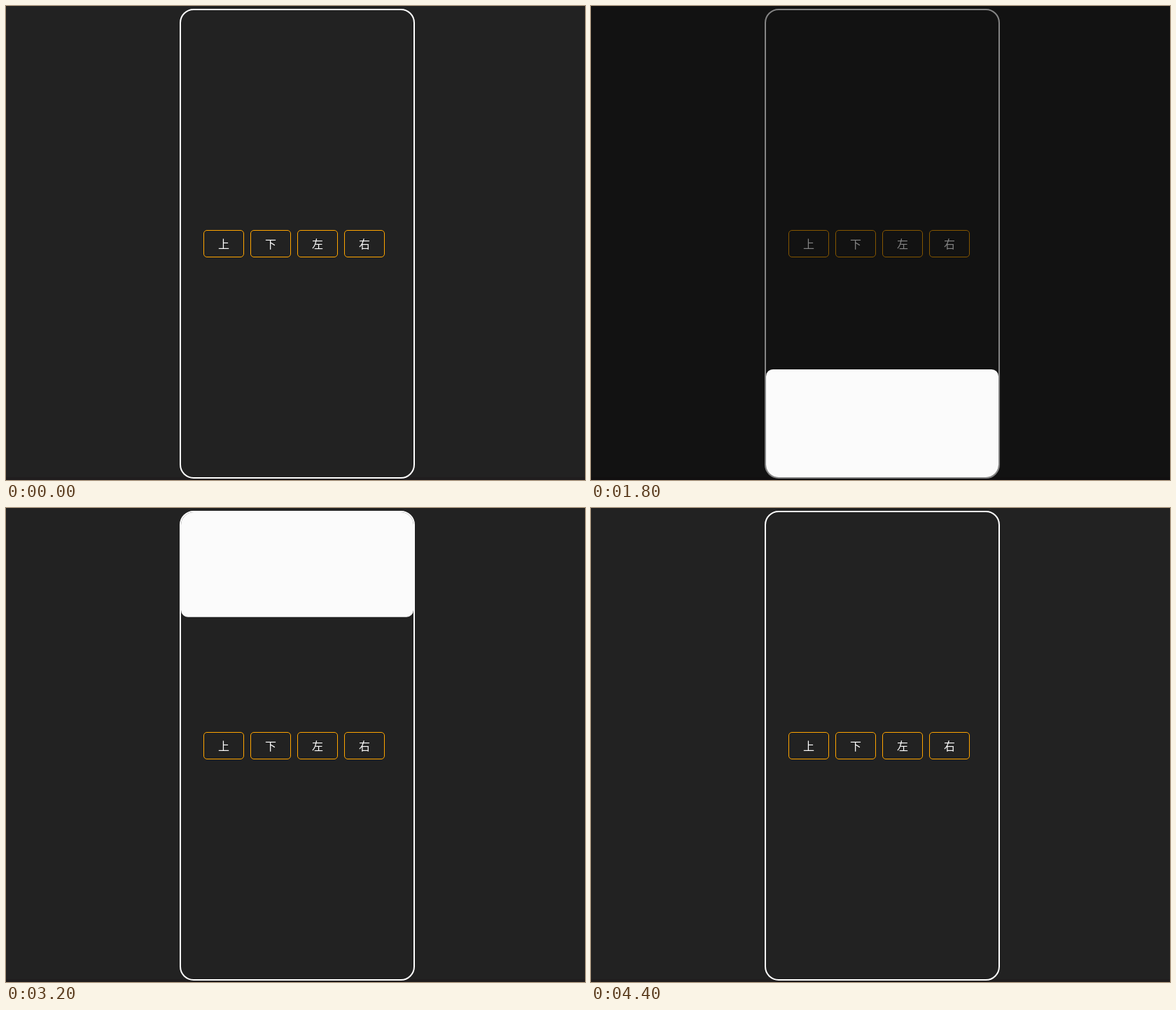
Animation, 827 px wide and 677 px high, one loop 4.7 s. Source, as an HTML page:

```html
<!DOCTYPE html>
<html lang="zh-CN">
<head>
<meta charset="utf-8">
<title>Drawers</title>
<style>
  html, body { margin: 0; width: 100%; height: 100%; overflow: hidden; background: #222; }
  svg { display: block; }
  text { font: 16px "Noto Sans CJK SC", "Noto Sans CJK", "Noto Sans CJK JP", sans-serif; fill: #fff; text-anchor: middle; }
</style>
</head>
<body>
<svg width="827" height="677" viewBox="0 0 827 677">
  <defs>
    <clipPath id="screen"><rect x="250" y="6" width="332" height="667" rx="18"/></clipPath>
  </defs>
  <rect width="827" height="677" fill="#222"/>
  <rect y="673" width="827" height="4" fill="#201d1e"/>
  <rect x="249" y="5" width="334" height="669" rx="19" fill="#222" stroke="#fff" stroke-width="2"/>
  <g id="buttons"></g>
  <rect id="shade" width="827" height="677" opacity="0"/>
  <g clip-path="url(#screen)"><rect id="drawer" rx="10" fill="#fbfbfb"/></g>
</svg>
<script>
const LOOP = 4700, STEP = 100, SLIDE = 300, SIZE = 192, DIM = 0.6;
const box = { x: 250, y: 6, w: 332, h: 667 };
const visits = [
  { side: 'right', open: 500, close: 1250 },
  { side: 'bottom', open: 1650, close: 2200 },
  { side: 'top', open: 2650, close: 3150 },
  { side: 'left', open: 3500, close: 4050 }
];
const byId = id => document.getElementById(id);
const shade = byId('shade'), drawer = byId('drawer');

byId('buttons').innerHTML = [...'上下左右'].map((label, i) => {
  const x = 282.5 + 67 * i;
  return `<rect x="${x}" y="320.5" width="57" height="38" rx="4.5" fill="none" stroke="orange"/>
    <text x="${x + 28.5}" y="346">${label}</text>`;
}).join('');

// cubic-bezier(.25, .1, .25, 1)
function ease(p) {
  if (p <= 0) return 0;
  if (p >= 1) return 1;
  let lo = 0, hi = 1, s;
  for (let i = 0; i < 24; i++) {
    s = (lo + hi) / 2;
    if (0.75 * s * (1 - s) + s ** 3 < p) lo = s; else hi = s;
  }
  return 0.3 * s * (1 - s) ** 2 + 3 * s * s * (1 - s) + s ** 3;
}

function place(side, shown) {
  const across = side === 'left' || side === 'right';
  const seen = SIZE * shown;
  const x = side === 'left' ? box.x - SIZE + seen : side === 'right' ? box.x + box.w - seen : box.x;
  const y = side === 'top' ? box.y - SIZE + seen : side === 'bottom' ? box.y + box.h - seen : box.y;
  const attrs = { x, y, width: across ? SIZE : box.w, height: across ? box.h : SIZE };
  for (const k in attrs) drawer.setAttribute(k, attrs[k]);
}

function draw(time) {
  const t = Math.floor((time % LOOP) / STEP) * STEP;
  // the first drawer starts to slide in only at the next step
  const v = visits.filter(d => t > d.open).pop();
  let shown = 0, dim = 0;
  if (v) {
    const closing = t >= v.close;
    const p = ease((t - (closing ? v.close : v.open)) / SLIDE);
    shown = closing ? 1 - p : p;
    dim = closing ? 0 : p * DIM;
  }
  drawer.setAttribute('visibility', shown > 0 ? 'visible' : 'hidden');
  shade.setAttribute('opacity', dim);
  if (v) place(v.side, shown);
}

const start = performance.now();
function tick() {
  draw(performance.now() - start);
  requestAnimationFrame(tick);
}
tick();
</script>
</body>
</html>
```
